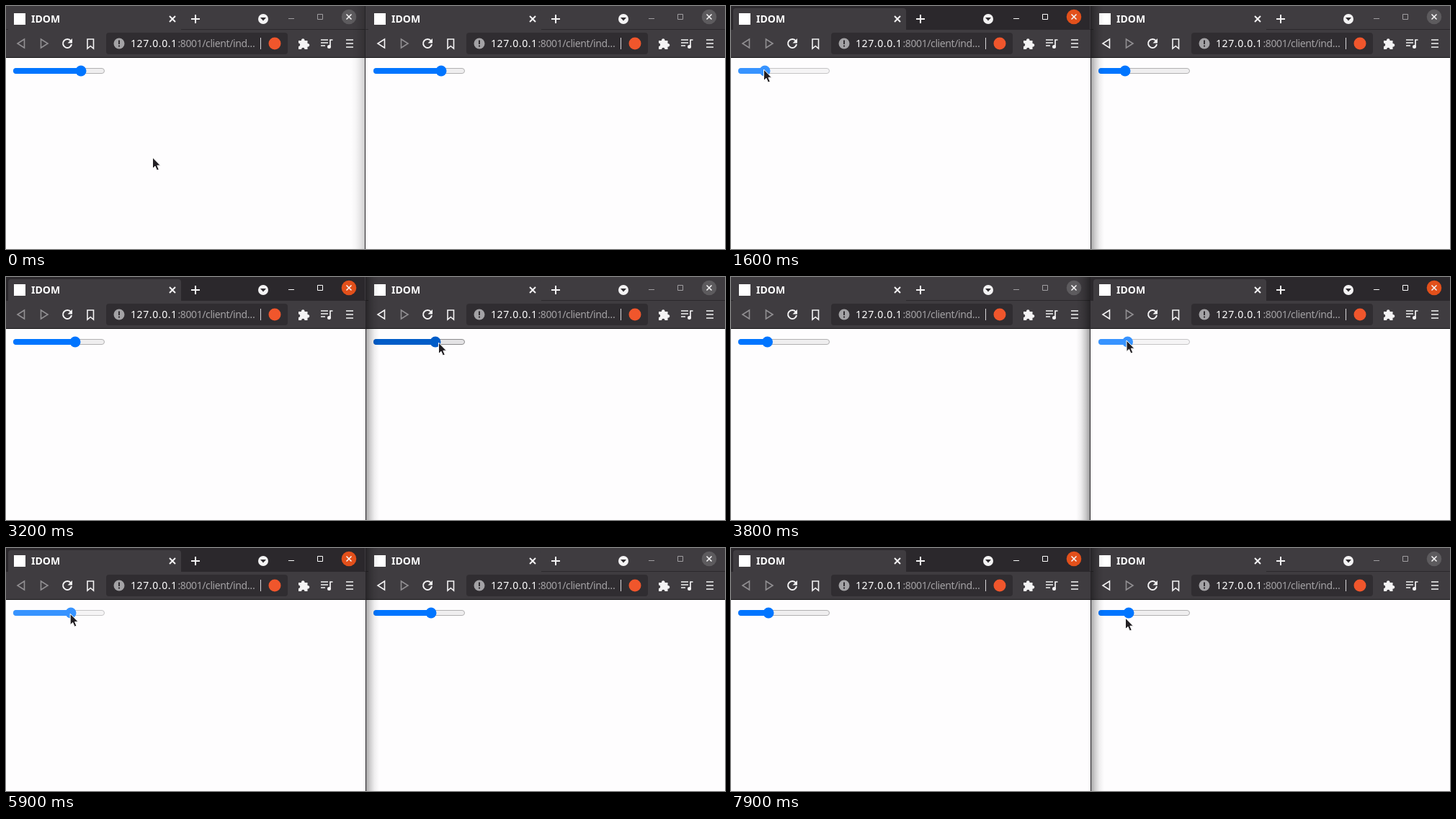
Recreate the animation shown at these times as an HTML page. Size 998 px wide and 337 px high, loop 8000 ms.

```html
<!DOCTYPE html>
<html lang="en">
<head>
<meta charset="utf-8">
<title>Synced sliders</title>
<style>
  html, body { margin: 0; width: 100%; height: 100%; overflow: hidden; background: #fefdfe; }
  svg { display: block; width: 100vw; height: 100vh; }
  text { font-family: "Noto Sans", "Open Sans", sans-serif; font-size: 14px; }
  .icon { fill: none; stroke: #f4f3f4; stroke-width: 2; }
  .solid { fill: #f4f3f4; }
  .dim { stroke: #918f92; }
</style>
</head>
<body>
<svg id="stage" viewBox="0 0 998 337">
  <defs>
    <linearGradient id="shade">
      <stop offset="0" stop-color="#000" stop-opacity=".38"/>
      <stop offset=".3" stop-color="#000" stop-opacity=".2"/>
      <stop offset=".65" stop-color="#000" stop-opacity=".06"/>
      <stop offset="1" stop-color="#000" stop-opacity="0"/>
    </linearGradient>
  </defs>
</svg>
<script>
const LOOP = 8000, STEP = 100;
const stage = document.getElementById('stage');

const windowMarkup = (side) => `
  <g id="win${side}" transform="translate(${side * 500})">
    <rect x="-2" width="502" height="337" fill="#fefdfe"/>
    <rect class="strip" x="-2" width="502" height="33"/>
    <path class="rule" d="M-2 32.5H3M243 32.5H500" stroke="#2b292c"/>
    <path d="M3 33V7q0-4 4-4H239q4 0 4 4V33Z" fill="#3f3c40"/>
    <rect x="-2" y="33" width="502" height="38" fill="#3f3c40"/>
    <rect x="-2" y="71" width="502" height="1" fill="#19181a"/>
    <rect x="11" y="10" width="16" height="16" fill="#fff"/>
    <text x="35" y="23" fill="#fff" font-weight="600">IDOM</text>
    <path class="icon" d="M227 14l8 8m0-8l-8 8M257 18h12m-6-6v12"/>
    <circle class="solid" cx="357" cy="18" r="7"/>
    <path d="M353 16h8l-4 4.5Z" fill="#302d31"/>
    <path class="control" d="M392 17.5h8M432.5 11.5h7v7h-7Z" fill="none"/>
    <circle class="close" cx="476" cy="15" r="10.3"/>
    <path class="icon" d="M472.5 11.5l7 7m0-7l-7 7" style="stroke-width:1.6"/>
    <path class="icon ${side ? '' : 'dim'}" d="M25.5 46v12L16 52Z" style="stroke-width:1.6"/>
    <path class="icon dim" d="M48.500 46v12L58 52Z" style="stroke-width:1.6"/>
    <path class="icon" d="M90 48.500A6 6 0 1 0 91 53"/>
    <path class="solid" d="M92 45v6.500h-6.500Z"/>
    <path class="icon" d="M113 46h8.500v13l-4.250-3.500L113 59Z" style="stroke-width:1.6"/>
    <rect x="139" y="37" width="252" height="30" rx="4" fill="#302d31"/>
    <circle cx="157" cy="52" r="7.500" fill="#a3a2a5"/>
    <path d="M157 47.500v5.500m0 1.500v2" stroke="#302d31" stroke-width="2"/>
    <text x="173" y="57" fill="#fff" letter-spacing=".6">127.0.0.1</text>
    <text x="238.500" y="57" fill="#a3a1a4" letter-spacing="-.4">:8001/client/ind…</text>
    <rect x="353" y="44" width="1" height="16" fill="#d8d7d9"/>
    <circle cx="373" cy="52" r="8.500" fill="#f0562c"/>
    <path class="solid" d="M406 48h4a2.300 2.300 0 1 1 4.500 0h4v4a2.300 2.300 0 1 1 0 4.500V60h-4a2.200 2.200 0 0 0-4.400 0H406v-4a2.200 2.200 0 0 0 0-4.400Z"/>
    <path class="icon" d="M437 47h10M437 51h10M437 55h6M450 57V47h3.500" style="stroke-width:1.700"/>
    <circle class="solid" cx="448.500" cy="56.500" r="2.500"/>
    <path class="icon" d="M472 47h10M472 52h10M472 57h10" style="stroke-width:1.700"/>
    <rect class="track" x="10.500" y="86.500" width="126" height="7" rx="3.500"/>
    <rect class="fill" x="10" y="86" height="8" rx="4"/>
    <circle class="thumb" cy="90" r="7.500"/>
  </g>`;

stage.insertAdjacentHTML('beforeend', windowMarkup(0) + windowMarkup(1) + `
  <rect id="shadow" width="19" height="337" fill="url(#shade)"/>
  <rect id="edge" width="1" height="337" fill="#252326"/>
  <path id="cursor" d="M0 0V15.500L3.500 12.200L6 18L8.800 16.800L6.400 11.200H11Z"
    fill="#221f23" stroke="#fff" stroke-linejoin="round"/>`);

const byId = (id) => document.getElementById(id);
const set = (el, attrs) => {
  for (const name in attrs) el.setAttribute(name, attrs[name]);
};
const wins = [0, 1].map((side) => {
  const part = (name) => byId('win' + side).querySelector('.' + name);
  return {
    strip: part('strip'), rule: part('rule'), control: part('control'), close: part('close'),
    track: part('track'), fill: part('fill'), thumb: part('thumb')
  };
});

// [time, thumb x]
const THUMB = [
  [0, 104], [1300, 100], [1400, 85], [1500, 62], [1600, 47], [1700, 68], [1800, 96],
  [3400, 93], [3500, 84], [3600, 72], [3700, 60], [3800, 50.5], [3900, 101.5], [4200, 104],
  [5500, 110], [5600, 126.5], [5900, 90], [6000, 40],
  [6200, 32], [6300, 25.5], [6400, 33], [6500, 45], [6600, 52]
];

// move: start, control point, end; drag: window and offset from the thumb
const POINTER = [
  { at: 400, end: 900, path: [[203.5, 210], [165, 140], [104, 90]] },
  { at: 1200, end: 1600, side: 0, dx: [0, -1.5], y: [90, 88] },
  { at: 2100, end: 3000, path: [[94.5, 88], [330, 306], [602, 93]] },
  { at: 3100, end: 3200, path: [[602, 93], [601, 92], [600.5, 91]] },
  { at: 3300, end: 3800, side: 1, dx: [4.5, -1.5], y: [91, 88] },
  { at: 4400, end: 5300, path: [[602.5, 88], [350, 228], [106.5, 92]] },
  { at: 5400, end: 6600, side: 0, dx: [2.5, -5.5], y: [92, 90] },
  { at: 7000, end: 7600, path: [[46.5, 90], [330, 295], [602, 180]] },
  { at: 7600, end: 7900, path: [[602, 180], [602, 115], [547.5, 97]] }
];

// [time, focused window, pressed window]; -1 is none
const STATES = [
  [0, -1, -1], [1100, 0, 0], [2000, 0, -1], [3300, 1, 1],
  [4300, 1, -1], [5400, 0, 0], [6900, 0, -1]
];

const COLORS = {
  idle: ['#0075ff', '#efeeef', '#b2b1b2'],
  hover: ['#005cc8', '#e4e3e5', '#8d8c8e'],
  press: ['#3793ff', '#f5f4f5', '#c5c4c6']
};

const latest = (rows, t) => rows.filter((row) => row[0] <= t).pop();
const mix = (a, b, k) => a + (b - a) * k;

function pointerAt(t, thumb) {
  const seg = POINTER.filter((s) => s.at <= t).pop() || POINTER[0];
  const k = Math.min(1, Math.max(0, (t - seg.at) / (seg.end - seg.at)));
  if (!seg.path) {
    return [seg.side * 500 + thumb + mix(...seg.dx, k), mix(...seg.y, k)];
  }
  const e = k * k * (3 - 2 * k);
  const [a, c, b] = seg.path;
  return [0, 1].map((i) => mix(mix(a[i], c[i], e), mix(c[i], b[i], e), e));
}

function draw(time) {
  const t = Math.floor((time % LOOP) / STEP) * STEP;
  const x = latest(THUMB, t)[1];
  const [, focus, pressed] = latest(STATES, t);
  const [px, py] = pointerAt(t, x);

  wins.forEach((win, side) => {
    const active = focus === side;
    set(win.strip, { fill: active ? '#2b282c' : '#3f3c40' });
    set(win.rule, { visibility: active ? 'hidden' : 'visible' });
    set(win.control, { stroke: active ? '#fff' : '#a09ea1' });
    set(win.close, { fill: active ? '#e2501b' : '#5d5b5e' });

    const left = side * 500 + 10;
    const over = px >= left && px <= left + 127 && py >= 82 && py < 97;
    const mode = pressed === side ? 'press' : over && pressed < 0 ? 'hover' : 'idle';
    const [accent, base, line] = COLORS[mode];
    set(win.track, { fill: base, stroke: line });
    set(win.fill, { fill: accent, width: x - 10 });
    set(win.thumb, { fill: accent, cx: x });
  });

  const leftOnTop = focus === 0;
  set(byId('edge'), { x: leftOnTop ? 499 : 498 });
  set(byId('shadow'), {
    transform: leftOnTop ? 'translate(499)' : 'translate(498) scale(-1 1)',
    opacity: focus < 0 ? 0.5 : 1
  });
  set(byId('cursor'), { transform: `translate(${px} ${py})` });
}

const start = performance.now();
function tick(now) {
  draw(Math.max(0, now - start));
  requestAnimationFrame(tick);
}
draw(0);
requestAnimationFrame(tick);
</script>
</body>
</html>
```
